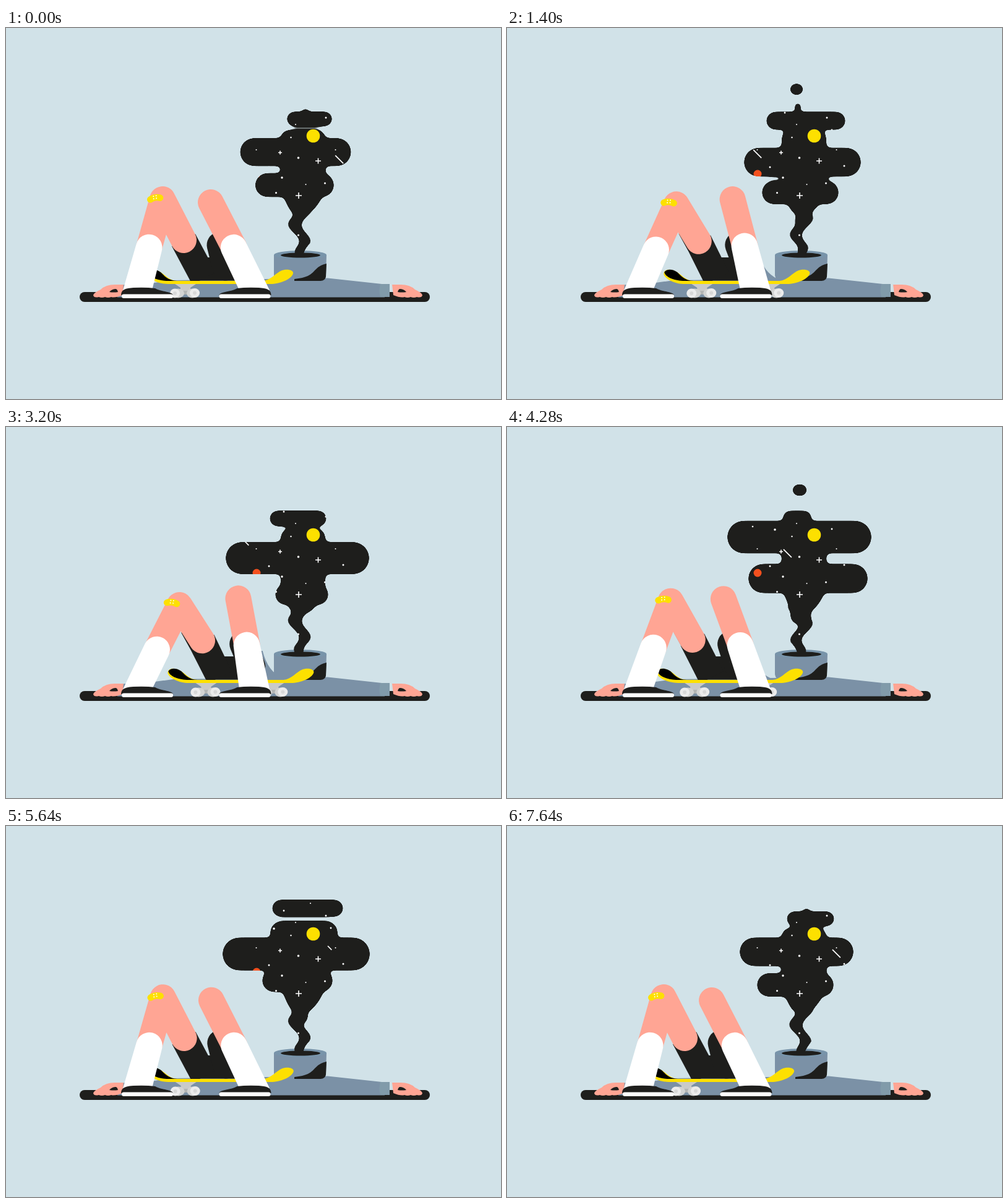
Recreate the animation shown at these times as an HTML page. Size 800 by 600 pixels, loop 7680 ms.

```html
<!DOCTYPE html>
<html lang="en">
<head>
<meta charset="utf-8">
<title>Daydream</title>
<style>
  html, body { margin: 0; width: 100%; height: 100%; overflow: hidden; background: #d1e2e8; }
  svg { display: block; width: 100%; height: 100%; }
  .ink { fill: #1e1e1c; }
  .cloth { fill: #7b91a6; }
  .skin { fill: #ffa594; }
  .yellow { fill: #fde000; }
  .white { fill: #fff; }
  .limb { fill: none; stroke: #ffa594; stroke-width: 42; stroke-linecap: round; stroke-linejoin: round; }
  .sleeve { fill: none; stroke: #1e1e1c; stroke-width: 43; }
</style>
</head>
<body>
<svg viewBox="0 0 800 600">
  <defs>
    <filter id="goo" filterUnits="userSpaceOnUse" x="330" y="50" width="290" height="330">
      <feGaussianBlur stdDeviation="4.5"/>
      <feColorMatrix values="1 0 0 0 0  0 1 0 0 0  0 0 1 0 0  0 0 0 22 -10.2"/>
    </filter>
    <mask id="smoke" maskUnits="userSpaceOnUse" x="330" y="50" width="290" height="330">
      <g class="white">
        <g filter="url(#goo)">
          <path d="M444 180Q444 165 459 165H502Q516 165 516 180V252Q514 280 490 300H463Q448 280 444 252Z"/>
          <g id="puffs"></g>
          <use href="#stem"/>
        </g>
        <path id="stem"/>
      </g>
    </mask>
    <g id="truck">
      <path fill="#c9cac9" d="M-17 414H17L8 420V429H-8V420Z"/>
      <rect x="-12" y="425" width="24" height="6" fill="#b3b5b4"/>
      <ellipse cx="-12" cy="429" rx="10" ry="7.5" fill="#d2d3d2"/>
      <ellipse cx="-17" cy="429" rx="8" ry="7.5" fill="#ececec"/>
      <ellipse cx="11" cy="429" rx="9" ry="7.5" fill="#d2d3d2"/>
      <ellipse cx="15" cy="428.500" rx="8" ry="7.5" fill="#ececec"/>
      <circle cx="-17" cy="429" r="3" fill="#d8d8d8"/>
      <circle cx="15" cy="428.500" r="3" fill="#d8d8d8"/>
    </g>
    <g id="shoe">
      <path class="ink" d="M186 432C186 423 193 421 206 420Q226 419 241 421C251 427 268 426 270 432Z"/>
      <rect class="white" x="187" y="430.500" width="83" height="6.500" rx="3.200"/>
    </g>
    <g id="hand">
      <path class="skin" d="M190 415H176Q161 415 153 423Q142 428 141 432Q142 437 150 435Q155 437 160 435Q165 437 170 435Q176 437 188 432Z"/>
      <path class="ink" d="M167 427Q171 422 178 422Q181 424 181 427Q174 428 167 427Z"/>
    </g>
  </defs>

  <rect class="ink" x="119" y="427" width="566" height="16" rx="8"/>
  <path class="cloth" d="M180 416L240 412L270 408L520 404.500L612 414.500V435.500H180Z"/>
  <path class="cloth" id="waist"/>
  <path fill="#819baa" d="M605 414H620V435H605Q602 425 605 414Z"/>
  <use href="#hand"/>
  <use href="#hand" transform="translate(814 0) scale(-1 1)"/>

  <path class="cloth" d="M433 367V400Q434 409 444 409H507Q517 409 517 400L518 367Z"/>
  <ellipse cx="475.500" cy="367" rx="42.500" ry="7" fill="#7894aa"/>
  <path class="ink" d="M466 406C486 404 493 399 499 392Q507 383 518 381L517 402Q516 409 507 409H466Z"/>
  <ellipse class="ink" cx="476" cy="367.500" rx="32" ry="4"/>

  <g mask="url(#smoke)">
    <rect class="ink" x="330" y="50" width="290" height="330"/>
    <circle class="yellow" cx="496.500" cy="174.500" r="10.800"/>
    <circle cx="405" cy="236" r="6.500" fill="#f4501e"/>
    <g class="white" id="stars"></g>
    <path id="crosses" stroke="#fff" stroke-width="1.600"/>
    <path id="meteors" stroke="#fff" stroke-width="1.700"/>
  </g>

  <path class="ink" id="shorts"/>
  <path class="sleeve" id="nearSleeve"/>
  <path class="sleeve" id="farSleeve" stroke-linecap="round"/>
  <g id="board">
    <use href="#truck" x="290"/>
    <use href="#truck" x="399"/>
    <path class="yellow" d="M228 398C228 390 238 389 246 393C256 397 262 408 275 409H415C428 408 436 396 446 392C456 389 465 392 464 397C462 405 446 413 430 414H262C246 414 230 406 228 398Z"/>
    <path class="ink" style="fill:#000" d="M229 395C233 389 243 390 250 395C257 402 262 408 276 409H259C244 408 231 403 229 395Z"/>
  </g>
  <path class="limb" id="farLeg"/>
  <path class="white" id="farSock"/>
  <path class="limb" id="nearLeg"/>
  <path class="white" id="nearSock"/>
  <g id="plaster">
    <path d="M-8 2Q0 -2 8 1" fill="none" stroke="#fde000" stroke-width="10.500" stroke-linecap="round"/>
    <path d="M-2.500 -2.500v0M2 -3v0M-2.500 1.500v0M2 1v0" stroke="#fff" stroke-width="2" stroke-linecap="round"/>
  </g>
  <use href="#shoe"/>
  <use href="#shoe" transform="translate(614.500 0) scale(-1 1)"/>
</svg>
<script>
const FRAMES = 192, STEP_MS = 40, SWAY = 48, RISE = 2.9;
const el = id => document.getElementById(id);
const draw = (id, d) => el(id).setAttribute('d', d);
const clamp = (v, lo, hi) => Math.min(hi, Math.max(lo, v));
const mix = (a, b, u) => a + (b - a) * u;

// Linear interpolation between keys [frame, ...values]; null outside them.
function sample(keys, f) {
  const i = keys.findIndex((k, n) => n && f >= keys[n - 1][0] && f <= k[0]);
  if (i < 1) return null;
  const a = keys[i - 1], b = keys[i], u = (f - a[0]) / (b[0] - a[0]);
  return a.slice(1).map((v, n) => mix(v, b[n + 1], u));
}

// Rising bands of smoke: [frame, y, left, right]; birth and death are added below.
const puffs = [
  [[191, 257, 404, 528], [209, 204, 380, 565], [227, 150, 419, 547]],
  [[170, 265, 445, 498], [191, 203.5, 376, 560]],
  [[170, 224, 397, 555], [180, 190, 392, 560], [191, 150, 452, 529]],
  [[35, 217, 383, 572]],
  [[35, 266, 412, 536], [55, 210, 375, 575], [80, 148, 426, 518]],
  [[80, 212, 355, 587], [107, 146, 446, 492]],
  [[80, 271, 435, 521], [107, 178, 356, 589]],
  [[107, 245, 390, 583], [122, 195, 360, 590], [141, 133, 430, 545]],
  [[141, 207, 350, 588], [163, 160, 440, 530], [170, 146, 446, 459]],
  [[141, 172, 427, 536], [170, 146, 482, 495]],
  [[141, 250, 414, 528], [156, 210, 395, 565], [170, 174, 399, 558], [184, 150, 450, 520], [190, 138, 480, 488]],
  [[35, 127, 464, 476]],
  [[107, 102, 461, 485]]
].map(keys => {
  const first = keys[0], last = keys[keys.length - 1], mid = (last[2] + last[3]) / 2;
  return [
    [first[0] - (312 - first[1]) / RISE, 312, 465, 485],
    ...keys,
    [last[0] + (last[1] - 85) / RISE, 85, mid, mid]
  ];
});
const stemPhase = [[0, 0], [35, 1.69], [80, 4.09], [107, 5.5], [141, 7.04], [170, 8.5], [192, 10]];

// Fixed sky, seen only through the smoke.
const stars = [
  [468, 156, 1], [517, 145, 1.5], [460.5, 177, 1.2], [404.5, 197, 1], [532.5, 197, 1], [472.5, 210, 1.8],
  [425, 225, 1.5], [545, 223, 1.5], [446, 242, 1.7], [484.5, 253, 1], [515.5, 251, 1.5], [436.5, 266.5, 1.5],
  [397, 161, 1.3], [433, 166, 1.8], [525, 165, 1.4], [449, 137, 1.4], [500, 296, 2], [472.5, 335, 1.5], [492, 125, 1]
];
el('stars').innerHTML = stars.map(([x, y, r]) => `<circle cx="${x}" cy="${y}" r="${r}"/>`).join('');
draw('crosses', [[443, 201.5, 3], [504.5, 215, 4.5], [473, 271, 5]]
  .map(([x, y, r]) => `M${x - r} ${y}h${2 * r}M${x} ${y - r}v${2 * r}`).join(''));
const meteors = [[8, 441, 192], [31, 386, 185], [44, 520, 194]];

el('puffs').innerHTML = '<rect/>'.repeat(puffs.length);
const puffRects = [...el('puffs').children];

function drawSmoke(f) {
  puffs.forEach((keys, i) => {
    const band = sample(keys, f) || sample(keys, f + FRAMES) || sample(keys, f - FRAMES);
    const [y, left, right] = band || [0, 0, 0];
    const w = right - left;
    const h = Math.min((22 + 0.13 * w) * clamp(0.75 + (y - 150) / 80, 0.75, 1), w * 1.1);
    const box = { x: left, y: y - h / 2, width: w, height: h, rx: h / 2 };
    for (const name in box) puffRects[i].setAttribute(name, box[name]);
  });

  const phase = sample(stemPhase, f)[0], leftSide = [], rightSide = [];
  for (let y = 368; y >= 288; y -= 4) {
    const swing = 8.5 * clamp((368 - y) / 20, 0, 1);
    const x = 475 + swing * Math.cos(2 * Math.PI * ((y - 345) / 54 + phase));
    const half = 7 + (368 - y) * 0.07;
    leftSide.push(`${x - half} ${y}`);
    rightSide.unshift(`${x + half} ${y}`);
  }
  draw('stem', `M${leftSide.join('L')}L${rightSide.join('L')}Z`);

  draw('meteors', meteors.map(([start, x, y]) => {
    const run = 6.3 * ((f - start + SWAY) % SWAY);
    const head = Math.min(run, 45), tail = Math.max(0, run - 13);
    return head > tail ? `M${x + tail} ${y + tail}L${x + head} ${y + head}` : '';
  }).join(''));
}

// Distance the board has rolled: strong ease out to the right and back.
function roll(f) {
  const k = f % SWAY, peak = 25;
  const u = k < peak ? k / peak : (SWAY - k) / (SWAY - peak);
  const ease = v => Math.pow(2, 1.5) * Math.pow(v, 2.5);
  return 39 * (u < 0.5 ? ease(u) : 1 - ease(1 - u));
}

// Round-topped sock, from partway up the shin down to a fixed ankle.
function drawSock(id, knee, ankle, part, left, right) {
  const x = mix(ankle, knee[0], part), y = mix(420, knee[1], part);
  const len = Math.hypot(knee[0] - ankle, knee[1] - 420), r = 21.3;
  const nx = r * (420 - knee[1]) / len, ny = r * (knee[0] - ankle) / len;
  draw(id, `M${left} 424L${x - nx} ${y - ny}A${r} ${r} 0 0 1 ${x + nx} ${y + ny}L${right} 424Z`);
}

function drawBody(s) {
  const near = [253 + 0.82 * s, 277 + 0.33 * s];
  const far = [331 + 1.33 * s, 277 + 5 * ((s - 27) / 27) ** 2];
  const thigh = [287 + 0.9 * s, 343 + 0.07 * s];
  const waist = 378 + 1.1 * s;

  draw('waist', `M${waist - 20} 362H${waist}Q${waist + 8} 395 ${waist + 32} 406H${waist - 20}Z`);
  draw('shorts', `M${266 + 0.77 * s} 307L${260 + 0.7 * s} 333L${276 + 0.7 * s} 362L${298 + 0.75 * s} 408.5` +
    `H${378 + 1.28 * s}L${365 + 1.28 * s} 371H${310 + 0.9 * s}L${thigh}Z`);
  draw('nearSleeve', `M${thigh}L${320 + 0.77 * s} 405`);
  draw('farSleeve', `M${346 + 1.1 * s} 351L${355 + 1.28 * s} 387`);
  el('board').setAttribute('transform', `translate(${s} 0)`);

  draw('farLeg', `M${far}L${mix(402, far[0], 0.47)} ${mix(420, far[1], 0.47)}`);
  drawSock('farSock', far, 401, 0.47, 377, 426);
  draw('nearLeg', `M${mix(213, near[0], 0.455)} ${mix(420, near[1], 0.455)}L${near}L${thigh}`);
  drawSock('nearSock', near, 213, 0.455, 189, 236);
  el('plaster').setAttribute('transform',
    `translate(${241 + 0.82 * s} ${274.5 + 0.27 * s}) rotate(${-6 + 0.5 * s})`);
}

function render(now) {
  const f = Math.floor(now / STEP_MS) % FRAMES;
  drawSmoke(f);
  drawBody(roll(f));
}

let start;
function tick(now) {
  start ??= now;
  render(now - start);
  requestAnimationFrame(tick);
}
render(0);
requestAnimationFrame(tick);
</script>
</body>
</html>
```
